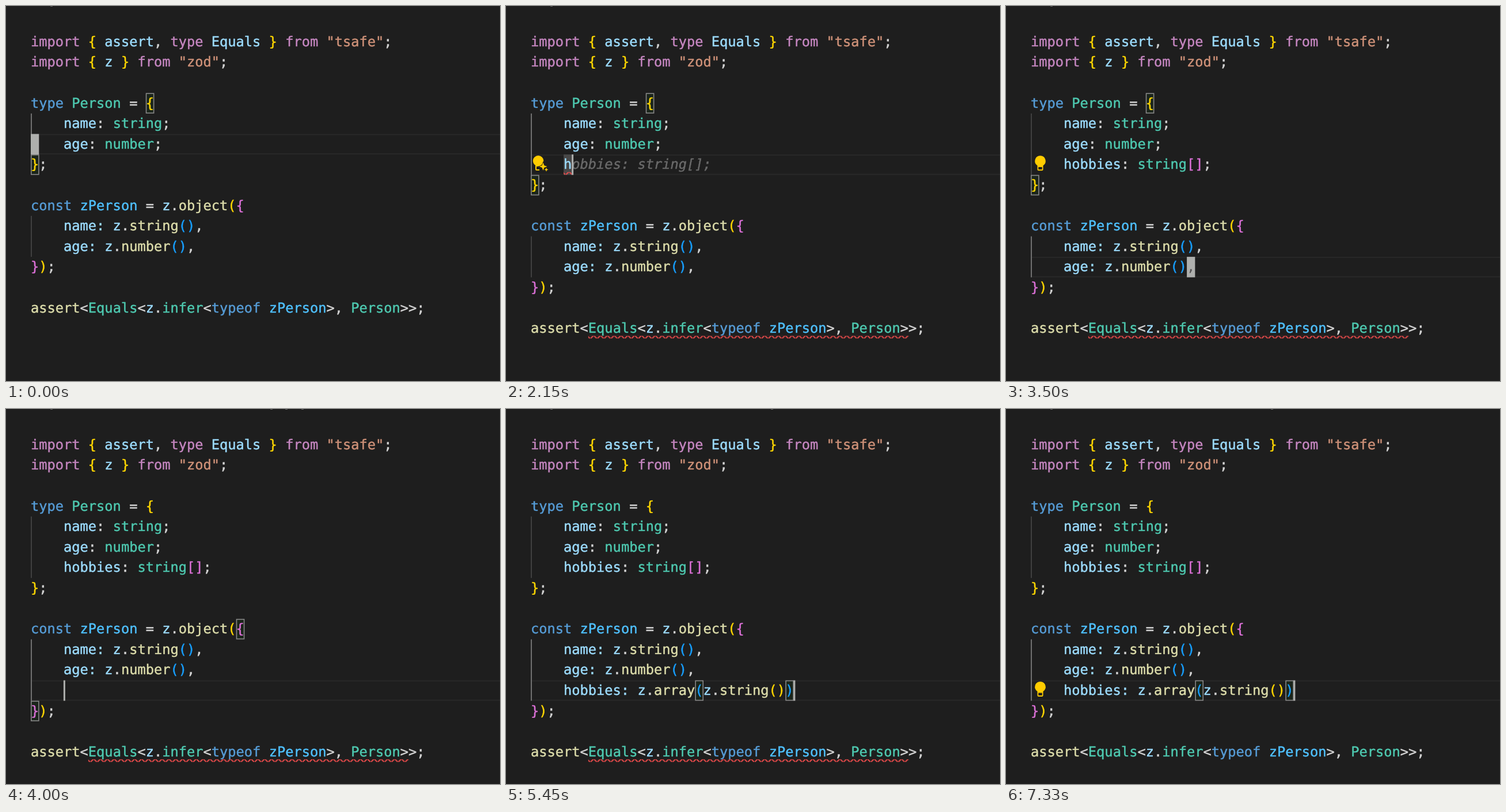
Animation, 858 px wide and 652 px high, one loop 7410 ms. Source, as an HTML page:

```html
<!DOCTYPE html>
<html lang="en">
<head>
<meta charset="utf-8">
<title>Type check in an editor</title>
<style>
  html, body { margin: 0; width: 100%; height: 100%; overflow: hidden; background: #1e1e1e; }
  svg { display: block; }
  text {
    font: 23.7px "DejaVu Sans Mono", "Liberation Mono", monospace;
    white-space: pre;
    text-rendering: geometricPrecision;
    stroke-width: .45px;
  }
  .ghost { font-style: italic; fill: #6a6a6a; }
</style>
</head>
<body>
<svg width="858" height="652" viewBox="0 0 858 652">
  <defs>
    <pattern id="wave" width="6" height="3" patternUnits="userSpaceOnUse">
      <path fill="#f14c4c" d="M5.5 0 2.5 3H1.1L4.1 0ZM4 0 6 2V.6L5.4 0ZM0 2 1 3H2.4L0 .6Z"/>
    </pattern>
    <g id="bulb">
      <path fill="#fc0" d="M16.5 2.2a9.3 9.3 0 0 0-5 17.1V26.2q0 2 2 2h6q2 0 2-2v-6.9A9.3 9.3 0 0 0 16.5 2.2Z"/>
      <path fill="#1e1e1e" d="M13.3 21.8h6.4v4.4h-6.4z"/>
    </g>
    <g id="sparkBulb">
      <circle cx="13" cy="11.2" r="9.2" fill="#fc0"/>
      <path fill="#fc0" d="M8 18h9.5l-1 3H10v4.8H15v2H10q-2 0-2-2Z"/>
      <path fill="#fc0" stroke="#1e1e1e" stroke-width="1.5" paint-order="stroke"
        d="M21.5 14 23.4 19.1 28.5 21 23.4 22.9 21.5 28 19.6 22.9 14.5 21 19.6 19.1Z"/>
      <path fill="#fc0" d="M27 23 28 25.5 30.5 26.5 28 27.5 27 30 26 27.5 23.5 26.5 26 25.5Z"/>
    </g>
  </defs>
  <g id="stage"></g>
</svg>
<script>
const LOOP = 7410;
const LEFT = 43, TOP = 44.5, ROW = 35.6, CHAR = 14.268, BASE = 25.2, PIXEL = 1.98;

// Each "|" part starts with the key of its colour.
const COLORS = {
  m: '#c586c0', y: '#ffd700', p: '#da70d6', u: '#179fff', v: '#9cdcfe', w: '#d4d4d4',
  o: '#ce9178', k: '#569cd6', t: '#4ec9b0', c: '#4fc1ff', f: '#dcdcaa'
};
const HEAD = [
  'mimport |y{ |vassert|w, |mtype |vEquals |y} |mfrom |o"tsafe"|w;',
  'mimport |y{ |vz |y} |mfrom |o"zod"|w;',
  '',
  'ktype |tPerson |w= |y{',
  'v    name|w: |tstring|w;',
  'v    age|w: |tnumber|w;'
];
const SCHEMA = [
  'y}|w;',
  '',
  'kconst |czPerson |w= |vz|w.|fobject|y(|p{',
  'v    name: z|w.|fstring|u()|w,',
  'v    age: z|w.|fnumber|u()|w,'
];
const TAIL = [
  'p}|y)|w;',
  '',
  'fassert|w<|tEquals|w<|vz|w.|tinfer|w<|ktypeof |czPerson|w>, |tPerson|w>>;'
];

// Every entry changes part of the editor state from its time on.
const TIMELINE = [
  [0, { typeLine: null, schemaLine: null, cursor: [5, 0], block: true, on: true,
        pair: [[3, 14], [6, 0]], ghost: '', mark: false, error: false, bulb: null, crumbs: [77] }],
  [550, { typeLine: '', cursor: [6, 4], block: false, pair: [[3, 14], [7, 0]] }],
  [1050, { on: false }],
  [1150, { typeLine: 'v    h', cursor: [6, 5], on: true }],
  [1300, { ghost: 'obbies: string[];' }],
  [1400, { mark: true, error: true }],
  [1650, { on: false }],
  [1700, { bulb: ['sparkBulb', 6] }],
  [2150, { on: true }],
  [2200, { typeLine: 'v    hobbies|w: |tstring|p[]|w;', cursor: [6, 22], ghost: '', mark: false, bulb: null }],
  [2700, { on: false }],
  [2750, { bulb: ['bulb', 6] }],
  [2950, { cursor: [6, 21], block: true, on: true, pair: [[6, 19], [6, 20]] }],
  [3150, { cursor: [7, 1], pair: [[3, 14], [7, 0]] }],
  [3350, { cursor: [8, 0] }],
  [3400, { cursor: [9, 21] }],
  [3425, { cursor: [10, 20] }],
  [3450, { cursor: [11, 19] }],
  [3550, { pair: [[11, 17], [11, 18]] }],
  [3700, { bulb: null }],
  [4000, { schemaLine: '', cursor: [12, 4], block: false, pair: [[9, 25], [13, 0]], crumbs: [77, 459, 485, 513] }],
  [4200, { ghost: 'hobbies: z.array(z.string())' }],
  [4500, { on: false }],
  [5000, { on: true }],
  [5100, { schemaLine: 'v    hobbies: z|w.|farray|u(|vz|w.|fstring|y()|u)', cursor: [12, 32], ghost: '',
           pair: [[12, 20], [12, 31]], crumbs: [77, 460] }],
  [5550, { error: false }],
  [5600, { on: false }],
  [5750, { bulb: ['bulb', 12] }],
  [6100, { on: true }],
  [6600, { on: false }],
  [7100, { on: true }]
];

const x = col => LEFT + col * CHAR;
const y = row => TOP + row * ROW;
const escapeText = s => s.replace(/&/g, '&amp;').replace(/</g, '&lt;');
const rect = (left, top, width, height, fill) =>
  `<rect x="${left}" y="${top}" width="${width}" height="${height}" fill="${fill}"/>`;
const text = (row, col, body, attrs = '') =>
  `<text x="${x(col)}" y="${y(row) + BASE}" ${attrs}>${body}</text>`;
const parts = line => line ? line.split('|') : [];
const plain = line => parts(line).map(part => part.slice(1)).join('');

// A thin stroke of the same colour gives the text its weight.
const codeLine = (line, row) => text(row, 0, parts(line).map(part => {
  const color = COLORS[part[0]];
  return `<tspan fill="${color}" stroke="${color}">${escapeText(part.slice(1))}</tspan>`;
}).join(''));

const guide = (first, last, row) =>
  rect(LEFT, y(first), 2, (last - first + 1) * ROW, row >= first && row <= last ? '#707070' : '#404040');

const bracketBox = ([row, col]) =>
  `<rect x="${x(col) + .8}" y="${y(row) + .8}" width="${CHAR - 1.2}" height="${ROW - 1.6}"
    fill="#006400" fill-opacity=".1" stroke="#888" stroke-width="1.6"/>`;

const squiggle = (row, col, length) =>
  `<g transform="translate(${x(col)} ${y(row + 1) - 3 * PIXEL}) scale(${PIXEL})">
    ${rect(0, 0, length * CHAR / PIXEL, 3, 'url(#wave)')}</g>`;

function cursorShape({ cursor: [row, col], block }, lines) {
  if (!block) return rect(x(col) - .2, y(row), 3, ROW, '#aeafad');
  const covered = plain(lines[row])[col] || '';
  return rect(x(col), y(row), CHAR, ROW, '#aeafad') + text(row, col, escapeText(covered), 'fill="#515052"');
}

function draw(state) {
  const { typeLine, schemaLine, cursor: [row, col] } = state;
  const optional = line => line === null ? [] : [line];
  const lines = [...HEAD, ...optional(typeLine), ...SCHEMA, ...optional(schemaLine), ...TAIL];
  const typeEnd = HEAD.length + optional(typeLine).length - 1;
  const schemaEnd = lines.length - TAIL.length - 1;
  const lastRow = lines.length - 1;

  return [
    ...state.crumbs.map(left => rect(left, 0, 4, 1, '#666')),
    rect(LEFT, y(row), 858 - LEFT, 2, '#282828'),
    rect(LEFT, y(row + 1) - 2, 858 - LEFT, 2, '#282828'),
    guide(4, typeEnd, row),
    guide(typeEnd + 4, schemaEnd, row),
    state.mark ? rect(x(4), y(6), CHAR, ROW, '#474747') : '',
    ...state.pair.map(bracketBox),
    ...lines.map(codeLine),
    text(row, col, state.ghost, 'class="ghost" stroke="#6a6a6a"'),
    state.mark ? squiggle(6, 4, 1) : '',
    state.error ? squiggle(lastRow, 7, 39) : '',
    state.bulb ? `<use href="#${state.bulb[0]}" x="${LEFT}" y="${y(state.bulb[1])}"/>` : '',
    state.on ? cursorShape(state, lines) : ''
  ].join('');
}

const stage = document.getElementById('stage');
let shown = 0;

function frame() {
  const time = performance.now() % LOOP;
  const passed = TIMELINE.filter(([at]) => at <= time);
  if (passed.length !== shown) {
    shown = passed.length;
    stage.innerHTML = draw(Object.assign({}, ...passed.map(([, change]) => change)));
  }
  requestAnimationFrame(frame);
}
frame();
</script>
</body>
</html>
```
